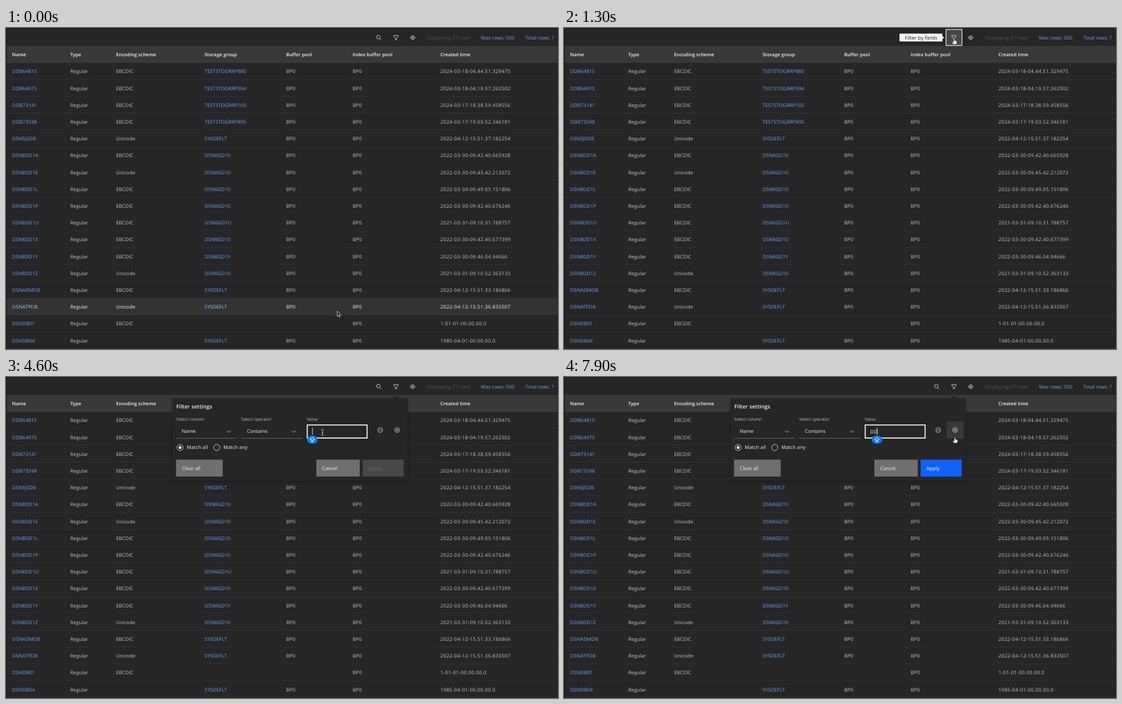
An HTML page for the animation above (8 s loop, 859 by 500 pixels).

```html
<!DOCTYPE html>
<html lang="en">
<head>
<meta charset="utf-8">
<title>Database list filter</title>
<style>
  html, body { margin: 0; height: 100%; overflow: hidden; background: #262626; }
  svg { display: block; width: 859px; height: 500px; }
  text { font: 7.64px "Open Sans", "Noto Sans", sans-serif; letter-spacing: .07px; text-rendering: geometricPrecision; fill: #c6c6c6; white-space: pre; }
  .head { font-weight: 600; font-size: 7.3px; fill: #f4f4f4; }
  .title { font-weight: 600; font-size: 8.4px; fill: #f4f4f4; }
  .label { font-size: 6.5px; }
  .time { letter-spacing: .33px; }
  .link { fill: #6fa2f8; }
  .lit { fill: #f4f4f4; }
  .dim { fill: #525252; }
  .hover text { fill: #f4f4f4; }
  .hover .link { fill: #a6c8ff; }
  .row rect { fill: #262626; }
  .hover rect { fill: #333; }
  .icon { fill: none; stroke: #e0e0e0; stroke-width: .8; }
</style>
</head>
<body>
<svg id="stage" viewBox="0 0 859 500"></svg>
<script>
const stage = document.getElementById("stage");

function add(parent, tag, attrs = {}, content) {
  const el = document.createElementNS("http://www.w3.org/2000/svg", tag);
  for (const k in attrs) el.setAttribute(k, attrs[k]);
  if (content !== undefined) el.textContent = content;
  return parent.appendChild(el);
}
const group = (parent = stage, cls = "") => add(parent, "g", { class: cls });
const rect = (p, x, y, width, height, fill, more) => add(p, "rect", { x, y, width, height, fill, ...more });
// y is the vertical middle of the capitals
const text = (p, x, y, str, cls = "") => add(p, "text", { x, y: y + 2.7, class: cls }, str);
const icon = (p, d, more) => add(p, "path", { d, class: "icon", ...more });
const ring = (p, cx, cy, r) => add(p, "circle", { cx, cy, r, class: "icon" });
const show = (el, on) => el.setAttribute("visibility", on ? "visible" : "hidden");

// ---- table ----
const TOP = 54.4, ROW = 26.2;
const columns = [9.6, 100, 171.3, 309, 436, 539.5, 676];
const styles = ["link", "", "", "link", "", "", "time"];
const E = "EBCDIC", U = "Unicode", S = "SYSDEFLT", G = "DSN8GD10";
const data = [
  ["DDB64815", E, "TESTSTOGRRP880", "2024-03-18-04.44.51.329475"],
  ["DDB64975", E, "TESTSTOGRRP594", "2024-03-18-04.19.57.262502"],
  ["DDB73141", E, "TESTSTOGRRP103", "2024-03-17-18.38.59.458556"],
  ["DDB73598", E, "TESTSTOGRRP895", "2024-03-17-19.03.52.346181"],
  ["DSN5JSDB", U, S, "2022-04-12-15.51.37.182254"],
  ["DSN8DD1A", E, G, "2022-03-30-09.42.40.665928"],
  ["DSN8DD1E", U, G, "2022-03-30-09.45.42.212072"],
  ["DSN8DD1L", E, G, "2022-03-30-09.49.05.151806"],
  ["DSN8DD1P", E, G, "2022-03-30-09.42.40.676246"],
  ["DSN8DD1U", E, "DSN8GD1U", "2021-03-31-09.10.31.788757"],
  ["DSN8DD1X", E, G, "2022-03-30-09.42.40.677399"],
  ["DSN8DD1Y", E, "DSN8GD1Y", "2022-03-30-09.46.04.94666"],
  ["DSN8DD1Z", U, G, "2021-03-31-09.10.52.363133"],
  ["DSNADMDB", E, S, "2022-04-12-15.51.33.186866"],
  ["DSNATPDB", U, S, "2022-04-12-15.51.36.833507"],
  ["DSNDB01", E, "", "1-01-01-00.00.00.0"],
  ["DSNDB04", "", S, "1985-04-01-00.00.00.0"]
];
const rows = data.map(([name, scheme, store, time], i) => {
  const g = group(stage, "row"), y = TOP + ROW * i;
  rect(g, 0, y, 859, ROW);
  add(g, "path", { d: `M0 ${y + ROW - .4}H859`, stroke: "#393939", "stroke-width": .7 });
  [name, "Regular", scheme, store, store && "BP0", "BP0", time].forEach((s, c) =>
    text(g, columns[c], y + 13.2, s, styles[c]));
  return g;
});
rect(stage, 0, 28, 859, 26.4, "#393939");
["Name", "Type", "Encoding scheme", "Storage group", "Buffer pool", "Index buffer pool", "Created time"]
  .forEach((s, c) => text(stage, columns[c], 41.2, s, "head"));

// ---- toolbar ----
const filterBtn = rect(stage, 594.4, 2.2, 24.9, 25, "#262626");
ring(stage, 579.4, 14.2, 2.8);
icon(stage, "M581.5 16.3L584 18.8");
icon(stage, "M603.5 11.7H610.2V13L607.9 15.6V18.3H605.8V15.6L603.5 13Z");
icon(stage, "M629 15Q632.8 9 636.7 15Q632.8 21 629 15Z");
ring(stage, 632.8, 15, 1.4);
text(stage, 655, 15, "Displaying 37 rows", "dim");
text(stage, 739, 15, "Max rows: 500", "link");
text(stage, 808, 15, "Total rows: ?", "link");
rect(stage, 0, 0, 859, 1, "#161616");
rect(stage, 0, 0, 1, 500, "#161616");

const tip = group();
add(tip, "path", { d: "M523 8.7H588Q589 8.7 589 9.7V13L591.6 15 589 17V20Q589 21 588 21H523Q522 21 522 20V9.7Q522 8.7 523 8.7Z", fill: "#f4f4f4" });
text(tip, 530.5, 15, "Filter by fields").style.fill = "#161616";

// ---- filter panel ----
const panel = group();
panel.style.filter = "drop-shadow(0 1px 2px rgba(0,0,0,.35))";
add(panel, "path", { d: "M259 33.5H601.5L606.7 29.5 612 33.5H625V161.5H259Z", fill: "#262626" });
text(panel, 265, 46, "Filter settings", "title");
[[265, "Select column"], [366, "Select operator"], [468, "Value"]].forEach(([x, s]) => text(panel, x, 65.2, s, "label"));

const fieldX = [265, 366.4, 468];
const fields = fieldX.map(x => {
  const box = rect(panel, x, 74, 94.5, 21.5, "#262626");
  rect(panel, x, 95, 94.5, .8, "#6f6f6f");
  return box;
});
[[273.5, "Name", 344], [375, "Contains", 445]].forEach(([x, s, cx]) => {
  text(panel, x, 84.7, s, "lit");
  icon(panel, `M${cx} 83.5L${cx + 2.8} 86.3 ${cx + 5.6} 83.5`);
});

const plusBox = rect(panel, 595.5, 69.5, 26.2, 26.2, "#393939");
for (const x of [582.4, 608.6]) {
  ring(panel, x, 82.6, 3.7);
  icon(panel, `M${x - 2} 82.6h4`);
}
icon(panel, "M608.6 80.6v4");

[[271, "Match all"], [328, "Match any"]].forEach(([x, s]) => {
  ring(panel, x, 109.8, 4.8);
  text(panel, x + 10.3, 109.6, s, "lit");
});
add(panel, "circle", { cx: 271, cy: 109.8, r: 2.4, fill: "#f4f4f4" });

const button = (x, w, s, fill) => [rect(panel, x, 128.7, w, 26.4, fill), text(panel, x + 9, 142, s, "lit")];
button(264.7, 72.5, "Clear all", "#6f6f6f");
button(483, 67.5, "Cancel", "#6f6f6f");
const [applyBox, applyText] = button(555, 63.8, "Apply", "#484848");

const focus = group(panel);
rect(focus, 468.7, 74.7, 93.2, 20.3, "#262626", { stroke: "#fff", "stroke-width": 1.5 });
const typed = text(focus, 476.6, 84.8, "", "lit");
const caret = rect(focus, 0, 79, .9, 11, "#e0e0e0");
const badge = group(focus);
rect(badge, -8, -6.2, 16, 12.4, "#0a7cff", { rx: 6 });
add(badge, "path", { d: "M0 -3.8L3.6 -.2H1.6V1.9H-1.6V-.2H-3.6ZM-1.6 3.5H1.6", fill: "none", stroke: "#fff", "stroke-width": .9 });

// ---- pointer ----
const shape = (d, fill, stroke) => add(stage, "path", { d, fill, stroke, "stroke-width": .7, "stroke-linejoin": "round" });
const pointers = {
  arrow: shape("M0 0V8L1.8 6.4 3 9.2 4.4 8.6 3.2 5.9H5.7Z", "#111", "#fff"),
  hand: shape("M-.9 .6Q0 -.7 .9 .6V3.4Q1.8 2.8 2.4 3.7 3.3 3.2 3.8 4.2 4.8 4 4.8 5.2V7L3.9 9.6H-1.2L-3.2 6.3Q-3.2 4.8 -1.9 5.5L-.9 6.4Z", "#fff", "#111"),
  beam: shape("M-2 -4.4Q0 -4.6 0 -3.4 0 -4.6 2 -4.4M0 -3.4V3.6M-1.2 .8H1.2M-2 4.6Q0 4.8 0 3.6 0 4.8 2 4.6", "none", "#eee")
};
const path = [
  [0, 515.5, 441], [100, 515.5, 441], [1000, 606.8, 16], [1500, 606.8, 16],
  [2100, 474.5, 95.5], [2400, 487, 91], [2800, 303, 86], [3200, 369, 88.3],
  [3600, 492.5, 86.2], [7200, 492.5, 86.2], [7550, 566, 55], [7900, 608, 93.5], [8000, 608, 93.5]
];
function pointerAt(t) {
  const i = path.findIndex(p => p[0] > t);
  const [t0, x0, y0] = path[i - 1], [t1, x1, y1] = path[i];
  const u = (t - t0) / (t1 - t0), k = u * u * (3 - 2 * u);
  return [x0 + (x1 - x0) * k, y0 + (y1 - y0) * k];
}

const OPEN = 1500, FOCUS = 3600, TYPE = 6700, HOVER_LAG = 100;
const inside = ([x, y], l, t, w, h) => x >= l && x < l + w && y >= t && y < t + h;
const onFilter = p => inside(p, 594, 2, 26, 26);
const onPlus = p => inside(p, 595.5, 69.5, 26.2, 26.2);
const onField = (p, i) => inside(p, fieldX[i], 74, 94.5, 21.4);

function draw(t) {
  const pos = pointerAt(t), late = pointerAt(Math.max(0, t - HOVER_LAG));
  const open = t >= OPEN, active = t >= FOCUS;
  const count = t < TYPE ? 0 : t < TYPE + 100 ? 1 : 2;

  const over = open ? -1 : Math.floor((late[1] - TOP) / ROW);
  rows.forEach((g, i) => g.classList.toggle("hover", i === over));

  filterBtn.setAttribute("fill", onFilter(late) ? "#474747" : "#262626");
  filterBtn.setAttribute("stroke", t >= 1100 && !active ? "#fff" : "none");
  filterBtn.setAttribute("stroke-width", open ? 1.5 : 1);
  show(tip, onFilter(late));

  show(panel, open);
  fields.forEach((f, i) => f.setAttribute("fill", i < 2 && onField(late, i) ? "#333" : "#262626"));
  plusBox.setAttribute("fill", onPlus(late) ? "#393939" : "#262626");
  applyBox.setAttribute("fill", count ? "#0f62fe" : "#484848");
  applyText.style.fill = count ? "#fff" : "#6f6f6f";

  const blinkFrom = count ? TYPE + 100 : FOCUS;
  const caretX = 476.5 + 5.2 * count;
  focus.setAttribute("display", active ? "inline" : "none");
  typed.textContent = "D".repeat(count);
  caret.setAttribute("x", caretX);
  caret.setAttribute("opacity", t < blinkFrom || Math.floor((t - blinkFrom) / 500) % 2 === 0 ? 1 : 0);
  const grow = Math.min(1, Math.max(0, (t - FOCUS + 100) / 300));
  badge.setAttribute("transform", `translate(${caretX + .2} 97.6) scale(${grow})`);

  const kind = open && onField(pos, 2) ? "beam" : onFilter(pos) || open && onPlus(pos) ? "hand" : "arrow";
  for (const k in pointers) {
    show(pointers[k], k === kind);
    pointers[k].setAttribute("transform", `translate(${pos})`);
  }
}

const STEP = 100, LOOP = 8000;
function tick() {
  draw(Math.floor(performance.now() % LOOP / STEP) * STEP);
  requestAnimationFrame(tick);
}
tick();
</script>
</body>
</html>
```
